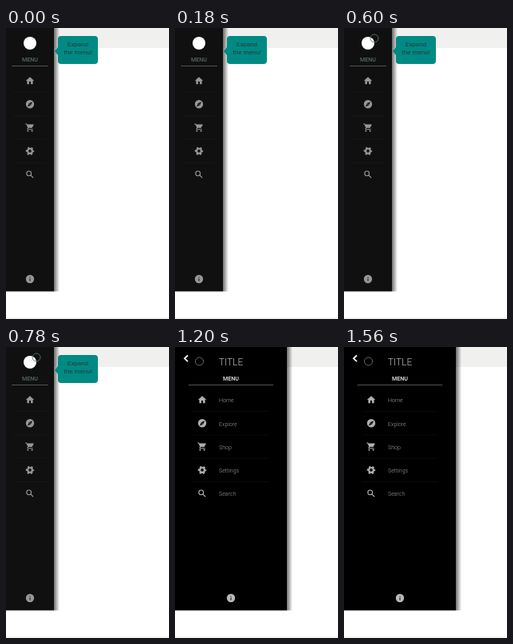
An HTML page that plays this animation: 204x364 px, repeating every 1800 ms.

```html
<!DOCTYPE html>
<html lang="en">
<head>
<meta charset="utf-8">
<title>Expanding menu</title>
<style>
  html, body { margin: 0; width: 100%; height: 100%; overflow: hidden; background: #fff; }
  svg { display: block; width: 100%; height: 100%; font-family: Roboto, Arial, sans-serif; }
  .mid { text-anchor: middle; }
  .line { fill: none; stroke: currentColor; }
</style>
</head>
<body>
<svg viewBox="0 0 204 364">
  <defs>
    <linearGradient id="shade">
      <stop offset="0" stop-color="#000" stop-opacity=".55"/>
      <stop offset=".5" stop-color="#000" stop-opacity=".28"/>
      <stop offset="1" stop-color="#000" stop-opacity="0"/>
    </linearGradient>
  </defs>
  <rect width="204" height="25" fill="#f0f0ef"/>
  <rect y="362.5" width="204" height="1" fill="#e6e6e6"/>
  <rect id="shadow" width="7" height="329.5" fill="url(#shade)"/>
  <rect id="panel" height="329.5"/>

  <circle id="logo" cx="30" cy="19" r="8" fill="#fff"/>
  <path id="back" d="M16 10.5 12 14.3 16 18.1" fill="none" stroke="#fff" stroke-width="1.8"/>
  <text id="title" class="mid" y="22.5" font-size="12" font-weight="300" fill="#bbb">TITLE</text>
  <text id="menu" class="mid" y="41.6" font-size="7.1" font-weight="500">MENU</text>
  <rect id="rule" y="47" height="1" fill="#505252"/>
  <g id="rows"></g>
  <g id="info"></g>

  <g id="tip">
    <path d="M69 10h42a4 4 0 0 1 4 4v27a4 4 0 0 1-4 4h-42a4 4 0 0 1-4-4v-7l-4-5 4-5v-10a4 4 0 0 1 4-4z" fill="#008a84"/>
    <g class="mid" font-size="8" fill="#263c3b">
      <text x="90" y="23.3">Expand</text>
      <text x="90" y="33">the menu!</text>
    </g>
  </g>
  <circle id="cursor"/>
</svg>
<script>
const $ = id => document.getElementById(id);
const set = (el, attrs) => {
  for (const key in attrs) el.setAttribute(key, attrs[key]);
};
const clamp = v => Math.min(1, Math.max(0, v));
const mix = (a, b, k) => a + (b - a) * k;

const disc = 'M2 12a10 10 0 0 1 20 0a10 10 0 0 1-20 0';
const wheel = x => `M${x} 20a2 2 0 0 1 4 0a2 2 0 0 1-4 0`;
const solid = d => `<path fill="currentColor" fill-rule="evenodd" d="${d}"/>`;

// Icons live in a 24-unit box.
const items = [
  ['Home', solid('M10 20v-6h4v6h5v-8h3L12 3 2 12h3v8z')],
  ['Explore', solid(disc + 'M6 18l3.8-8.2L18 6l-3.8 8.2z') +
    '<circle cx="12" cy="12" r="1.1" fill="currentColor"/>'],
  ['Shop', solid('M1 2v2h2l3.6 7.6-1.6 3.4q0 2 2 2h12v-2H7.4l.7-2h7.5q1.2 0 1.8-1l3.6-6.5q.5-1.5-1-1.5H5.2l-.9-2z' +
    wheel(5) + wheel(15))],
  ['Settings', `<circle class="line" cx="12" cy="12" r="5.6" stroke-width="4.2"/>
    <circle class="line" cx="12" cy="12" r="8.4" stroke-width="3.4" pathLength="12" stroke-dasharray="1" stroke-dashoffset=".5"/>`],
  ['Search', `<circle class="line" cx="9.5" cy="9.5" r="5.5" stroke-width="2.2"/>
    <path class="line" d="M13.8 13.8 20 20" stroke-width="2.6"/>`]
];
const icon = art => `<g transform="scale(.52) translate(-12 -12)">${art}</g>`;

$('rows').innerHTML = items.map(([name, art], i) => `
  <g transform="translate(0 ${66 + i * 29.3})">
    <g class="icon">${icon(art)}</g>
    <text class="label" y="3.2" font-size="7" font-weight="300" fill="#a0a0a0">${name}</text>
    ${i < 4 ? '<rect class="split" y="14.2" height=".8"/>' : ''}
  </g>`).join('');
$('info').innerHTML = icon(solid(disc + 'M11 7h2v2h-2zM11 11h2v6h-2z'));

const each = (cls, attrs) =>
  document.querySelectorAll('.' + cls).forEach(el => set(el, attrs));

// time, x, y of the pointer
const path = [[0, 190, -14], [300, 118.5, 1.5], [600, 38, 13], [900, 30.8, 18.3], [1200, 30.5, 18], [1800, 30.5, 18]];
function pointer(t) {
  const i = path.findIndex(p => p[0] > t);
  const [a, b] = [path[i - 1], path[i]];
  const k = (t - a[0]) / (b[0] - a[0]);
  return { cx: mix(a[1], b[1], k), cy: mix(a[2], b[2], k) };
}

function draw(t) {
  const open = clamp((t - 640) / 480);
  const width = mix(60, 140, open);
  const mid = width / 2;
  const inset = width * .12;
  const iconX = Math.max(30, width * .243);
  const shown = clamp(open * 1.6);
  const grey = (a, b) => { const v = mix(a, b, open); return `rgb(${v},${v},${v})`; };

  set($('panel'), { width, fill: grey(16, 0) });
  set($('shadow'), { x: width });
  set($('logo'), { opacity: open ? 0 : 1 });
  set($('back'), { opacity: shown });
  set($('title'), { x: mid, opacity: shown });
  set($('menu'), { x: mid, fill: open ? '#f0f0f0' : '#566b66' });
  set($('rule'), { x: inset, width: width - 2 * inset });
  each('icon', { transform: `translate(${iconX} 0)`, color: grey(150, 175) });
  each('label', { x: iconX + 21, opacity: shown });
  each('split', { x: width * .16, width: width * .68, fill: grey(26, 14) });
  set($('info'), { transform: `translate(${mid} 314)`, color: grey(150, 185) });
  set($('tip'), { opacity: clamp(1 - open * 1.4) });

  const pressed = t < 600;
  set($('cursor'), {
    ...pointer(t),
    r: pressed ? 4.6 : 5,
    fill: pressed ? '#7c7c7c' : 'none',
    stroke: pressed ? 'none' : open ? grey(160, 115) : '#56736d',
    'stroke-width': .9
  });
}

// The motion is sampled at a coarse, fixed rate.
const loop = 1800, step = 300;
const start = performance.now();
function tick() {
  const t = (performance.now() - start) % loop;
  draw(Math.min(1200, Math.floor(t / step) * step));
  requestAnimationFrame(tick);
}
tick();
</script>
</body>
</html>
```
